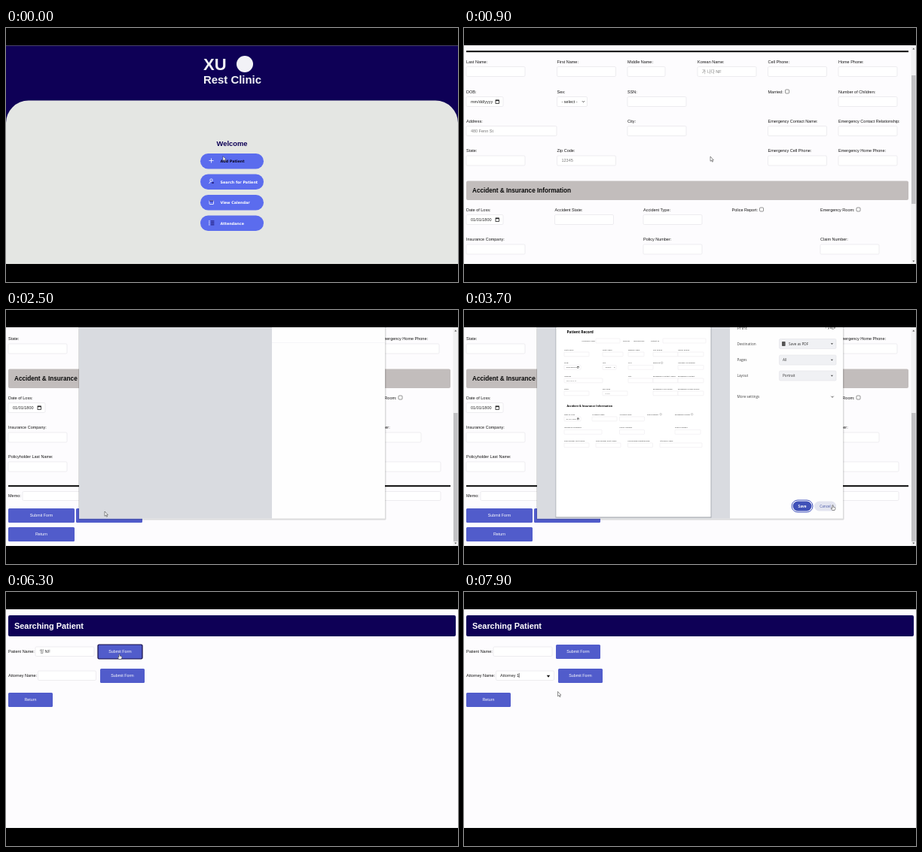
Write an HTML page that moves like this. It is 600 by 338 pixels and loops after 8000 ms.

```html
<!DOCTYPE html>
<html lang="en">
<head>
<meta charset="utf-8">
<title>Clinic records demo</title>
<style>
  html, body { margin: 0; height: 100%; overflow: hidden; background: #000; }
  svg { display: block; width: 100vw; height: 100vh; font-family: "Liberation Sans", "Noto Sans CJK KR", sans-serif; }
  text { white-space: pre; }
  .home { font-family: "DejaVu Sans", sans-serif; }
  .panel { font-family: "Open Sans", sans-serif; }
</style>
</head>
<body>
<svg id="stage" viewBox="0 0 600 338"></svg>
<script>
const NAVY = '#0e0056', BLUE = '#515ccb', PAPER = '#fdfcfe', LOOP = 8000;

// Markup helpers; text is placed by its vertical centre.
const text = (x, y, str, size = 5.5, fill = '#151515', extra = '') =>
  `<text x="${x}" y="${y + size * 0.36}" font-size="${size}" fill="${fill}" ${extra}>${str.replace('&', '&amp;')}</text>`;
const bold = 'font-weight="700"';
const middle = 'text-anchor="middle"';
const rect = (x, y, w, h, fill, r = 0, extra = '') =>
  `<rect x="${x}" y="${y}" width="${w}" height="${h}" fill="${fill}" rx="${r}" ${extra}/>`;
const path = (d, stroke, width = 0.7, fill = 'none') =>
  `<path d="${d}" stroke="${stroke}" stroke-width="${width}" fill="${fill}"/>`;
const group = (id, body, extra = '') => `<g id="${id}" ${extra}>${body}</g>`;
const button = (x, y, w, label, extra = '') =>
  rect(x, y, w, 19, BLUE, 1.5, extra) + text(x + w / 2, y + 9.5, label, 5.3, '#fff', middle);
const caret = (x, y, k = 1) => path(`M${x - 1.6 * k} ${y - 0.8 * k}l${1.6 * k} ${1.6 * k}l${1.6 * k} ${-1.6 * k}`, '#222', 0.8 * k);
const box = (x, y, w, h, k = 1) => rect(x, y, w, h, '#fff', 1.5 * k, `stroke="#e3e1e6" stroke-width="${k > 0.9 ? 0.6 : 0.4}"`);

// A label with its control below, or a checkbox beside it when value is true.
function field(k, x, y, label, w, value = '') {
  let out = label.split('|').map((s, i) => text(x, y + i * 3, s, 5.5 * k)).join('');
  if (value === true)
    return out + rect(x + w, y - 3 * k, 5 * k, 5 * k, '#fff', k, `stroke="#666" stroke-width="${0.7 * k}"`);
  const mid = y + 13 * k;
  out += box(x, mid - 6.5 * k, w, 13 * k, k);
  const solid = /[/-]/.test(value);
  if (value) out += text(x + 6 * k, mid, value, 5.5 * k, solid ? '#222' : '#777');
  if (value.includes('/')) {
    const ix = x + w - 10 * k;
    out += rect(ix, mid - 2 * k, 4.4 * k, 4.4 * k, 'none', 0, `stroke="#222" stroke-width="${0.8 * k}"`) +
      rect(ix, mid - 2.3 * k, 4.4 * k, 1.4 * k, '#222');
  }
  return value.includes('select') ? out + caret(x + w - 5 * k, mid, k) : out;
}
const fields = (k, rows) => rows.map(([y, ...items]) => items.map(f => field(k, f[0], y, ...f.slice(1))).join('')).join('');

const STREET = '480 Fenn St', SELECT = '- select -', DATE = 'mm/dd/yyyy', LOSS = '01/01/1800', SECTION = 'Accident & Insurance Information';

const webRows = [
  [45, [3, 'Last Name:', 78], [123.5, 'First Name:', 78], [217, 'Middle Name:', 50], [310, 'Korean Name:', 78, '가 나다 NF'],
    [403.5, 'Cell Phone:', 78], [497, 'Home Phone:', 78]],
  [85, [3, 'DOB:', 49, DATE], [123.5, 'Sex:', 40, SELECT], [217, 'SSN:', 78], [403.5, 'Married:', 23, true], [497, 'Number of Children:', 78]],
  [124, [3, 'Address:', 120, STREET], [217, 'City:', 78], [403.5, 'Emergency Contact Name:', 78], [497, 'Emergency Contact Relationship:', 78]],
  [163.5, [3, 'State:', 78], [123.5, 'Zip Code:', 78, '12345'], [403.5, 'Emergency Cell Phone:', 78], [497, 'Emergency Home Phone:', 78]],
  [242, [3, 'Date of Loss:', 49, LOSS], [120.5, 'Accident State:', 78], [238, 'Accident Type:', 78],
    [355.5, 'Police Report:', 37, true], [473, 'Emergency Room:', 48, true]],
  [281.5, [3, 'Insurance Company:', 78], [238, 'Policy Number:', 78], [473, 'Claim Number:', 78]],
  [320.5, [3, 'Policyholder Last Name:', 78], [138, 'Policyholder First Name:', 78], [272, 'Policyholder Relationship:', 78], [408, 'Attorney Name:', 169]]
];
const printRows = [
  [53, [133, 'Last Name', 33], [184, 'First Name', 27], [218, 'Middle Name', 21], [251, 'Cell Phone', 33], [284, 'Home Phone', 34]],
  [70.5, [133, 'DOB', 22, DATE], [184, 'Sex', 18, SELECT], [218, 'SSN', 33], [251, 'Married', 10.5, true], [284, 'Number of Children', 34]],
  [88, [133, 'Address', 51, STREET], [218, 'City', 33], [251, 'Emergency Contact Name', 33], [284, 'Emergency Contact|Relationship', 34]],
  [105, [133, 'State', 33], [184, 'Zip Code', 33, '12345'], [251, 'Emergency Cell Phone', 33], [284, 'Emergency Home Phone', 34]],
  [139, [133, 'Date of Loss', 22, LOSS], [170, 'Accident State', 33], [206.5, 'Accident Type', 33], [243, 'Police Report', 17, true], [280, 'Emergency Room', 21.5, true]],
  [156.5, [133, 'Insurance Company', 50], [206.5, 'Policy Number', 33], [280, 'Claim Number', 34]],
  [174, [133, 'Policyholder Last Name', 33], [175, 'Policyholder First Name', 33], [217.5, 'Policyholder Relationship', 33], [260, 'Attorney Name', 56]]
];

const icons = [
  path('M272.5 173.5v6M269.5 176.5h6', '#fff', 0.8),
  '<circle cx="272.5" cy="202.5" r="1.7" fill="none" stroke="#fff" stroke-width=".8"/>' + path('M271.5 204l-2 3', '#fff', 0.8) + path('M273 206h3', NAVY, 1.2),
  rect(270, 229.5, 5.5, 5, 'none', 0.5, 'stroke="#fff" stroke-width=".8"') + path('M270 230h5.5', NAVY, 1),
  path('M269 257h1.5M269 259.4h1.5M269 261.8h1.5', '#fff', 1) + path('M271.8 257h4.6M271.8 259.4h4.6M271.8 261.8h4.6', NAVY, 0.9)
];
const home = rect(0, 23, 600, 292, NAVY) + rect(0, 23, 600, 0.8, '#55536c') +
  text(262, 48, 'XU', 22, '#f2f2f6', bold) + '<circle cx="317" cy="48" r="11" fill="#f2f2f6"/>' +
  text(262, 68.5, 'Rest Clinic', 14.9, '#f2f2f6', bold) +
  path('M0 315V127A30 30 0 0 1 30 96.5H570A30 30 0 0 1 600 127V315Z', 'none', 0, '#e4e6e3') +
  text(300, 154, 'Welcome', 9.35, NAVY, bold + middle) +
  ['Add Patient', 'Search for Patient', 'View Calendar', 'Attendance'].map((label, i) => {
    const y = 167 + i * 27.5;
    return rect(258, y, 84, 20.4, '#5b6cee', 10.2) + icons[i] +
      text(284.5, y + 10.4, label, 4.85, '#fff', `class="home" id="item${i}" ${bold}`);
  }).join('');

const form = rect(3, -25, 587, 28, NAVY, 2) + text(11, -11, 'Patient Record', 10.9, '#fff', bold) +
  text(80, 14, 'Insurance Type:') + box(122, 8, 100, 12) + text(245, 14, 'Filed Inj:') + box(268, 8, 50, 12) +
  text(274, 14, DATE) + text(370, 14, 'Patient ID:') + box(400, 8, 177, 12) +
  rect(3, 30.2, 587, 2, '#080808') + fields(1, webRows) +
  rect(3, 203.5, 587, 25.5, '#c2bdbc', 2) + text(11, 216.2, SECTION, 8.2, '#080808', bold) +
  rect(3, 358.2, 587, 2, '#080808') + text(3, 372, 'Memo:') + box(22, 366.5, 555, 12) +
  button(3, 389, 88, 'Submit Form') + button(93, 389, 88, 'Print Form') + button(3, 414, 88, 'Return');

const scrollbar = rect(593.5, 23, 6.5, 292, '#f1f1f2') + path('M595.3 28.5l1.5-2l1.5 2z', 'none', 0, '#555') +
  path('M595.3 309.5l1.5 2l1.5-2z', 'none', 0, '#555') + rect(594, 63, 5.5, 171, '#c1c1c3', 0, 'id="thumb"');

const option = (y, label, value, x = 423) => text(362.5, y, label, 4.7, '#444') +
  rect(418.5, y - 6.5, 75.5, 13, '#f0f1f4', 1.5, 'stroke="#dcdde2" stroke-width=".5"') +
  text(x, y, value, 4.7, '#333') + path(`M486.8 ${y - 0.8}h3.2l-1.6 1.9z`, 'none', 0, '#444');
const dialog = rect(96, 20, 408.5, 259.5, '#0002', 1.5) + rect(97, 20, 406, 257.5, '#fefefe') + rect(97, 20, 256, 257.5, '#d9dbe0') +
  group('loading', rect(353, 43, 150, 0.5, '#ececf0')) +
  group('preview', rect(121.5, 20, 207, 256.5, '#aaadb3') + rect(122.3, 20, 205.2, 255.3, '#fff') +
    text(136.5, 28.8, 'Patient Record', 4.8, '#000', bold) +
    text(156.5, 41, 'Insurance Type', 2.48) + box(175, 38, 32, 6, 0.45) + text(211, 41, 'Filed Inj', 2.48) +
    text(225, 41, DATE, 2.48) + text(248, 41, 'Patient ID', 2.48) + box(264, 38, 57, 6, 0.45) +
    fields(0.45, printRows) + text(136.5, 128, SECTION, 3.6, '#000', bold) +
    text(362.5, 23.5, 'Print', 6, '#444') + text(493.5, 23.5, '1 page', 4.7, '#444', 'text-anchor="end"') +
    option(45, 'Destination', 'Save as PDF', 431) + rect(422, 42, 4.6, 6, '#555', 0.7) +
    option(66.5, 'Pages', 'All') + option(87.5, 'Layout', 'Portrait') +
    text(362.5, 115.5, 'More settings', 4.7, '#444') + caret(489, 115.5) +
    rect(435, 253, 28, 16, '#fff', 8, 'stroke="#4555bd" stroke-width="1"') + rect(436.5, 254.5, 25, 13, '#4051b8', 6.5) +
    text(449, 261, 'Save', 4.7, '#fff', middle + bold) + rect(465, 254.5, 29, 13, '#e3e5f0', 6.5) +
    text(479.5, 261, 'Cancel', 4.7, '#4555a5', middle), 'class="panel"');

const search = rect(3, 31, 594, 28, NAVY, 2) + text(11, 45, 'Searching Patient', 10.9, '#fff', bold) +
  text(3, 79, 'Patient Name:') + box(39, 73, 78, 12.5) + text(45, 79, '', 5.5, '#333', 'id="patient"') +
  button(122, 70, 59, 'Submit Form', 'id="submit" stroke-width="1.2"') +
  text(3, 111, 'Attorney Name:') + box(42.5, 105, 77, 12.5) + text(48, 111, '', 5.5, '#222', 'id="attorney"') +
  group('picker', path('M109.8 110.8h4.4l-2.2 3z', 'none', 0, '#111') + rect(72.8, 108, 0.6, 6, '#111')) +
  button(125, 102, 59, 'Submit Form') + button(3, 134, 59, 'Return');

const cursor = group('arrow', path('M0 0V6.3L1.5 5L2.6 7.2L3.5 6.8L2.5 4.7H4.3Z', '#222', 0.5, '#fff')) +
  group('hand', path('M-.6 .4Q0-.3 .6 .4V2.6L3 3.2Q3.5 3.5 3.3 5L2.6 7H-.7L-2.3 4.4Q-2.2 3.6-1.4 4L-.6 4.7Z', '#222', 0.5, '#fff'));

document.getElementById('stage').innerHTML = rect(0, 23, 600, 292, PAPER) +
  group('home', home) + group('record', group('form', form) + scrollbar) + group('dialog', dialog) + group('search', search) +
  group('status', rect(0, 306, 34.5, 8.5, '#d8dadc', 1) + text(1.5, 310, '127.0.0.1:8080/', 4.3, '#444')) +
  rect(0, 0, 600, 23, '#000') + rect(0, 314, 600, 24, '#000') + group('cursor', cursor);

const $ = id => document.getElementById(id);
const show = (id, on) => $(id).setAttribute('display', on ? 'inline' : 'none');
const within = (t, ...spans) => spans.some(([a, b]) => t >= a && t < b);

// Eased value between [time, ...values] keys.
function track(t, keys) {
  const i = keys.findIndex(key => key[0] > t);
  if (i < 0) return keys.at(-1).slice(1);
  if (!i) return keys[0].slice(1);
  const a = keys[i - 1], b = keys[i], p = (t - a[0]) / (b[0] - a[0]), e = p * p * (3 - 2 * p);
  return a.slice(1).map((v, j) => v + (b[j + 1] - v) * e);
}
const pointerKeys = [
  [0, 288, 170.5], [300, 290, 171], [800, 327, 171], [1300, 327, 171], [1900, 131, 268], [2800, 131, 268], [3400, 489.5, 259.5],
  [4000, 489.5, 259.5], [4500, 74, 299], [4900, 74, 299], [5300, 298, 201], [5500, 298, 201], [5800, 75, 77], [6000, 75, 77],
  [6200, 150.5, 82.5], [6500, 150.5, 82.5], [7100, 50, 299], [7200, 50, 299], [7400, 30, 155], [7600, 78, 111], [7800, 124.5, 132.5]
];
const scrollKeys = [[500, 56], [800, 0], [1200, 0], [1600, -125], [6400, -125], [6401, 56], [6700, 56], [7100, -125]];

function draw(now) {
  const t = Math.floor(now % LOOP / 100) * 100;
  const atHome = within(t, [0, 300], [4800, 5500]);
  const atForm = within(t, [300, 4800], [6500, 7400]);
  show('home', atHome);
  show('record', atForm);
  show('search', !atHome && !atForm);
  show('dialog', within(t, [2300, 4000]));
  show('loading', t < 2800);
  show('preview', t >= 2800);
  show('status', within(t, [4500, 4900], [7200, 7400]));
  $('item0').setAttribute('fill', t < 300 ? '#0b0620' : '#fff');
  $('item1').setAttribute('fill', within(t, [5200, 5500]) ? '#0b0620' : '#fff');

  const [scroll] = track(t, scrollKeys);
  $('form').setAttribute('transform', `translate(0 ${scroll})`);
  $('thumb').setAttribute('y', 63 - scroll * 0.592);

  $('patient').textContent = t < 7400 ? '밍 NF'.slice(0, Math.max(0, (t - 5700) / 100)) : '';
  $('attorney').textContent = t >= 7800 ? 'Attorney 1' : '';
  show('picker', t >= 7800);
  $('submit').setAttribute('stroke', within(t, [6200, 6500]) ? '#150c45' : 'none');

  const hand = within(t, [1700, 2300], [3300, 4000], [4500, 4900], [5200, 5500], [6200, 6500], [7100, 7400]);
  show('hand', hand);
  show('arrow', !hand);
  $('cursor').setAttribute('transform', `translate(${track(t, pointerKeys)})`);
}
(function tick() {
  draw(performance.now());
  requestAnimationFrame(tick);
})();
</script>
</body>
</html>
```
